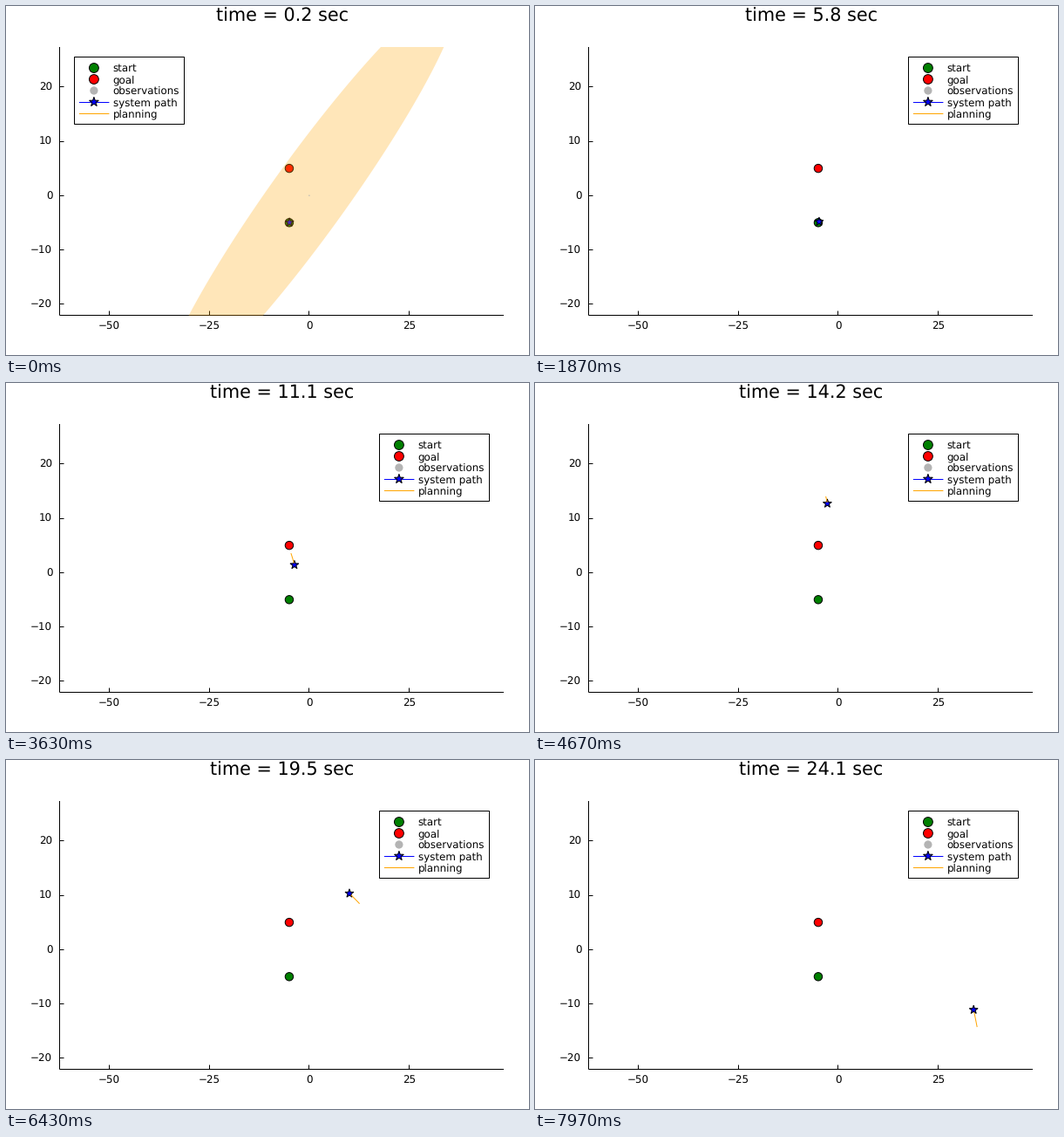
Animation of 600x400 px, one loop 8 s. Source, as a matplotlib script:

```python
import numpy as np
import matplotlib.pyplot as plt
from matplotlib.animation import FuncAnimation
from matplotlib.patches import Circle, Polygon, Rectangle

plt.rcParams.update({"font.family": "DejaVu Sans", "text.hinting": "none"})

STEPS, TICKS = 240, 2  # simulation steps, animation ticks per step
PX = 0.72              # points per pixel at 100 dpi
LABEL, TITLE = 11.87 * PX, 20.77 * PX
LEFT, RIGHT, TOP, BOTTOM = 61.5, 571, 47, 354.5
LEGEND_SHIFT = 350


def logistic(z):
    return 1 / (1 + np.exp(-z))


def position(t):
    """Star: slow drift, swing right; climb past the goal, then fall."""
    x = 325.2 + 0.9 * max(t - 5, 0) + 174 * logistic(0.707 * (t - 20.565))
    climb = 131.5 * logistic(0.8085 * (t - 12.143))
    fall = 33.5 * 1.2 * np.log1p(np.exp((t - 19.05) / 1.2))
    return np.array([x, 248 - climb + fall])


def planned_path(t):
    """Short curve ahead of the star, steered by its velocity."""
    v = (position(t + 0.05) - position(t - 0.05)) / 0.1
    end = np.array([0.42 * v[0] + 0.2 * min(v[1], 0), 0.6 * v[1]])
    bend = 0.4 * end + 0.04 * v
    s = np.linspace(0.16, 1, 12)[:, None]
    return position(t) + 2 * s * (1 - s) * bend + s * s * end


def to_px(x, y):
    return 347.9 + 4.59 * x, 217.2 - 6.22 * y


def star_points(x, y, r):
    a = np.arange(10) * np.pi / 5
    radius = np.where(np.arange(10) % 2, 0.39, 1) * r
    return np.column_stack([x + radius * np.sin(a), y - radius * np.cos(a)])


fig = plt.figure(figsize=(6, 4), dpi=100, facecolor="white")
ax = fig.add_axes([0, 0, 1, 1])
ax.set(xlim=(0, 600), ylim=(400, 0))
ax.axis("off")


def add(patch):
    patch.set_snap(False)
    return ax.add_patch(patch)


def line(xs, ys, color="black", z=2):
    return ax.plot(xs, ys, color=color, lw=PX, zorder=z, snap=False,
                   solid_capstyle="butt")[0]


def disc(x, y, r, color, edge="black", z=4):
    return add(Circle((x, y), r, fc=color, ec=edge, lw=PX, zorder=z))


def star_mark(x, y, r, z):
    return add(Polygon(star_points(x, y, r), fc="blue", ec="black", lw=PX,
                       joinstyle="miter", zorder=z))


def label(x, y, text, align="left", size=LABEL):
    return ax.text(x, y, text, ha=align, va="baseline", fontsize=size, zorder=7)


def draw_axes():
    line([LEFT, LEFT], [TOP, BOTTOM])
    line([LEFT, RIGHT], [BOTTOM, BOTTOM])
    for v in range(-50, 26, 25):
        x = to_px(v, 0)[0]
        mid = np.floor(x) + 0.5
        line([mid, mid], [BOTTOM, BOTTOM - 5])
        label(x, 370.5, str(v).replace("-", "\u2212"), "center")
    for v in range(-20, 21, 10):
        y = to_px(0, v)[1]
        mid = np.floor(y) + 0.5
        line([LEFT, LEFT + 5], [mid, mid])
        label(53.3, y + 4.2, str(v).replace("-", "\u2212"), "right")


def draw_legend(dx):
    x = 100.9 + dx
    rows = 71 + 13 * np.arange(5)
    parts = [
        add(Rectangle((78.5 + dx, 58.5), 126, 77, fc="white", ec="black",
                      lw=PX, zorder=5)),
        disc(x, rows[0], 5.4, "green", z=6),
        disc(x, rows[1], 5.4, "red", z=6),
        disc(x, rows[2], 4.6, "#b4b4b4", "none", z=6),
        line([x - 17, x + 17.5], [rows[3] + 0.5] * 2, "blue", 6),
        star_mark(x, rows[3], 5.7, 6.1),
        line([x - 17, x + 17.5], [rows[4] + 0.5] * 2, "orange", 6),
    ]
    names = ("start", "goal", "observations", "system path", "planning")
    return parts + [label(122.6 + dx, y + 4.2, s) for y, s in zip(rows, names)]


draw_axes()
title = label(316.7, 18, "", "center", TITLE)
legends = [draw_legend(0), draw_legend(LEGEND_SHIFT)]

disc(*to_px(-5, -5), 4.7, "green")
disc(*to_px(-5, 5), 4.7, "red")
star = star_mark(0, 0, 5.2, 4.2)
plan = line([], [], "orange", 4.4)

# sheared ellipse of the first, very uncertain prediction
a = np.linspace(0, 2 * np.pi, 400)
dy = 232.8 * np.sin(a)
band = add(Polygon(np.column_stack([348 + 52.9 * np.cos(a) - 0.695 * dy, 217 + dy]),
                   fc="orange", ec="none", alpha=0.275, zorder=4.6))
band.set_clip_path(Rectangle((LEFT, TOP), RIGHT - LEFT, BOTTOM - TOP,
                             transform=ax.transData))
dot = disc(*to_px(0, 0), 0.7, "#b4b4b4", "none", 4.7)


def update(k):
    # a step is shown half a tick pair early, so rounding never delays it
    step = min((k + 1) // TICKS, STEPS - 1)
    t = 0.2 + 0.1 * step
    title.set_text(f"time = {t:.1f} sec")
    star.set_xy(star_points(*position(t), 5.2))
    plan.set_data(*planned_path(t).T)

    first = step == 0
    plan.set_visible(not first)
    band.set_visible(first)
    dot.set_visible(first)
    for parts, shown in zip(legends, (first, not first)):
        for p in parts:
            p.set_visible(shown)
    return []


anim = FuncAnimation(fig, update, frames=STEPS * TICKS,
                     interval=8000 / (STEPS * TICKS),
                     init_func=lambda: update(0), repeat=True, repeat_delay=0)
plt.show()
```
